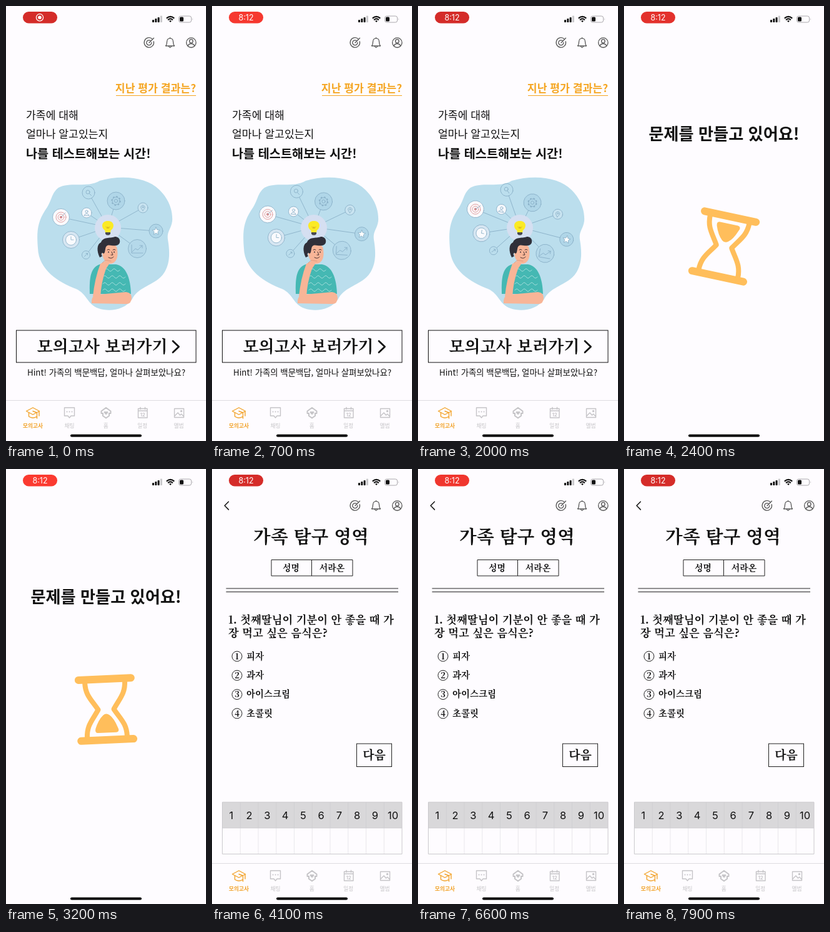
An HTML page for the animation above (8000 ms loop, 320x692 px).

```html
<!DOCTYPE html>
<html lang="ko">
<head>
<meta charset="utf-8">
<title>가족 탐구 영역</title>
<style>
html, body { margin: 0; width: 100%; height: 100%; overflow: hidden; background: #fefcff; }
svg { display: block; width: 320px; height: 692px; }
text { font-family: "Noto Sans CJK KR", "Noto Sans CJK", sans-serif; fill: #111; }
.serif { font-family: "Noto Serif CJK KR", "Noto Serif KR", "Noto Sans CJK KR", "Noto Sans CJK", serif; font-weight: 600; }
.num { font-family: Inter, Roboto, sans-serif; }
.b { font-weight: 700; }
.mid { text-anchor: middle; }
.line { fill: none; stroke-linecap: round; stroke-linejoin: round; }
</style>
</head>
<body>
<svg viewBox="0 0 320 692">
  <rect width="320" height="692" fill="#fefcff"/>

  <g id="status">
    <rect id="pill" x="27" y="9" width="55" height="18.5" rx="9.25"/>
    <g id="rec">
      <circle cx="54" cy="18.3" r="5.6" fill="none" stroke="#fff" stroke-width="1.3"/>
      <circle cx="54" cy="18.3" r="2.8" fill="#fff"/>
    </g>
    <text id="clock" class="num mid" x="54.5" y="23" font-size="12.5" style="fill:#fff">8:12</text>
    <g fill="#111">
      <rect x="234" y="22" width="3" height="4" rx=".8"/>
      <rect x="238.3" y="20" width="3" height="6" rx=".8"/>
      <rect x="242.6" y="18" width="3" height="8" rx=".8"/>
      <rect x="246.9" y="15.5" width="3" height="10.5" rx=".8" fill="#c9c8cb"/>
    </g>
    <g class="line" stroke="#111" stroke-width="2.1" style="stroke-linecap:butt">
      <path d="M256.8 19.6Q263 14 269.2 19.6M259.1 22.2Q263 18.7 266.9 22.2"/>
      <path d="M263 26l-2-2.2q2-1.5 4 0z" fill="#111" stroke="none"/>
    </g>
    <rect x="276.5" y="16" width="20" height="10" rx="3" fill="none" stroke="#aaa8ac"/>
    <rect x="278" y="17.5" width="6" height="7" rx="1.5" fill="#111"/>
    <path d="M298 19.3q1.6 1.7 0 3.4z" fill="#aaa8ac"/>
  </g>

  <g id="chrome">
    <g class="line" stroke="#555" stroke-width="1.3">
      <path d="M233.5 52A7.7 7.7 0 1 0 236.3 56.3M231 55A4 4 0 1 0 232.8 58M229 58.5l7.5-7.5"/>
      <path d="M255.5 63.5q2-2 2-6.5c0-7.5 10-7.5 10 0q0 4.500 2 6.500zM260.5 64.5q2 3 4 0M262.5 51.3v-1"/>
      <circle cx="296.3" cy="58.3" r="7.7"/>
      <circle cx="296.3" cy="56" r="2.8"/>
      <path d="M291 63.5q1.2-3.5 5.3-3.5t5.3 3.5"/>
    </g>
    <path d="M0 627.5H320" stroke="#dedce0"/>
    <g class="line" stroke="#f2a32b" stroke-width="1.4">
      <path d="M32.5 644.5l10.5-5.5 10.5 5.500-10.500 5.500zM36.500 647v6q6.500 4.500 13 0v-6M53 645v7M43 644.500l6.500 2.500v9"/>
    </g>
    <g class="line" stroke="#c5c4c7" stroke-width="1.4">
      <path d="M93.500 639h16v13h-5.500l-2.500 3-2.500-3h-5.500z"/>
      <path d="M97.500 645.500h.1M101.500 645.500h.1M105.500 645.500h.1" stroke-width="1.900"/>
      <path d="M152.500 644.500l7.500-5.500 7.500 5.500v3.500h-2.500v4l-5 3.500-5-3.500v-4h-2.500z" stroke-width="2"/>
      <path d="M160 650l-3-3c0-3 3-2 3-.5 0-1.500 3-2.500 3 .5z" fill="#c5c4c7" stroke-width=".6"/>
      <path d="M211.500 640.500h14.500v14.500h-14.500zM211.500 644h14.500M215 638.500v3M222.500 638.500v3"/>
      <path d="M269.500 640.500h15v14h-15zM270 652l5-5 3.500 4 2-2 4 4"/>
      <circle cx="280.500" cy="644.500" r="1"/>
    </g>
    <text class="num mid b" x="218.7" y="652.8" font-size="7.3" style="fill:#c5c4c7">12</text>
    <g id="tabs" font-size="8.7" class="mid"></g>
  </g>

  <g id="home">
    <text class="b" x="304" y="137" font-size="17.2" text-anchor="end" style="fill:#f5a623">지난 평가 결과는?</text>
    <path d="M176 142.5H304" stroke="#f5a623"/>
    <text x="32" y="180" font-size="17.2">가족에 대해</text>
    <text x="32" y="210" font-size="17.2">얼마나 알고있는지</text>
    <text class="b" x="32" y="241.5" font-size="19.7">나를 테스트해보는 시간!</text>
    <path fill="#bbdeed" d="M150 278C185 268 225 272 245 292C262 308 267 328 266 342C264 356 257 358 259 372C263 395 263 420 243 435C228 446 210 450 202 466C190 484 165 487 148 481C130 475 130 458 112 450C85 440 52 420 51 385C49 360 50 345 62 326C74 310 72 298 84 289C103 279 130 290 150 278Z"/>
    <g id="orbit" class="line" stroke="#86adc5" stroke-width=".8"></g>
    <circle cx="163" cy="353" r="21" fill="#d5dff1"/>
    <path d="M163 342c-11 0-11 11-4.5 15v3h9v-3c6.5-4 6.5-15-4.5-15z" fill="#fbea24"/>
    <path d="M160 351l2 3 1-3 1 3 2-3" class="line" stroke="#d4a91c" stroke-width=".8"/>
    <path d="M159 360h8v2.5l-2 2h-4l-2-2z" fill="#4a4a52"/>
    <path d="M134 458C133 430 136 416 150 411L176 411C192 414 199 432 200 458Z" fill="#45b8b3"/>
    <g id="waves" class="line" stroke="#a4dedb" stroke-width="1"></g>
    <path d="M137 473Q136 459 148 459L192 455Q201 456 201 464 201 474 192 474z" fill="#f8b597"/>
    <path d="M139 462Q142 433 151 410l10-5 5 4-6 9Q152 440 151 464z" fill="#f8b597"/>
    <path d="M155 384Q167 373 177 383C181 398 177 409 167 410 156 408 152 397 155 384z" fill="#f8b597"/>
    <path d="M150 400C145 390 145 379 152 376 156 366 169 370 174 367 184 367 184 378 179 380 171 384 164 377 160 383 158 388 159 393 156 394 154 391 151 394 154 398z" fill="#30303a"/>
    <path d="M162 388q2-2 4 0M171 388q2-2 4 0M169 391l2 5h-3M164 400q5 3 8-1" class="line" stroke="#4b3433" stroke-width="1"/>
    <path d="M164 391.5h.1M173 391.5h.1" class="line" stroke="#30303a" stroke-width="1.8"/>
    <path d="M154 409q4-6 9-4l5 1" class="line" stroke="#e0977b" stroke-width=".9"/>
    <rect x="16.5" y="516" width="287.5" height="51" fill="none" stroke="#111"/>
    <text class="serif mid" x="154" y="550.5" font-size="26">모의고사 보러가기</text>
    <path d="M267 533l9.5 9-9.5 9" class="line" stroke="#111" stroke-width="2.8"/>
    <text class="mid" x="160.5" y="588" font-size="13.4">Hint! 가족의 백문백답, 얼마나 살펴보았나요?</text>
  </g>

  <g id="loading">
    <text class="b mid" x="160" y="213" font-size="26.2">문제를 만들고 있어요!</text>
    <g id="glass">
      <g class="line" stroke="#ffbe5b">
        <path d="M-42-48.5H42M-42 48.5H42" stroke-width="12"/>
        <path stroke-width="8" d="M-32-44C-32-24-23-17-12.5 0C-23 17-32 24-32 44M32-44C32-24 23-17 12.5 0C23 17 32 24 32 44"/>
        <path id="stream" stroke-width="3.5" d="M0 8V-34"/>
      </g>
      <path id="full" class="sand" fill="#ffbe5b"/>
      <path id="heap" class="sand" fill="#ffbe5b"/>
    </g>
  </g>

  <g id="quiz">
    <path d="M26.5 52l-6.3 6.3 6.3 6.3" class="line" stroke="#111" stroke-width="1.5"/>
    <text class="serif mid" x="158.5" y="118" font-size="28.8">가족 탐구 영역</text>
    <path d="M95 144.5H225V170H95zM159.5 144.5V170M22.5 190H298M22.5 195.5H298" fill="none" stroke="#222"/>
    <text class="serif mid" x="126.5" y="162" font-size="14">성명</text>
    <text class="serif mid" x="192" y="162" font-size="14">서라온</text>
    <g font-size="17.4">
      <text class="serif" x="26" y="246">1. 첫째딸님이 기분이 안 좋을 때 가</text>
      <text class="serif" x="26" y="267">장 먹고 싶은 음식은?</text>
    </g>
    <g id="options"></g>
    <rect x="231.5" y="437" width="56" height="36.5" fill="none" stroke="#222"/>
    <text class="serif mid" x="259.5" y="462" font-size="19">다음</text>
    <rect x="16.5" y="530" width="287.5" height="41" fill="#d9d8da"/>
    <g id="table"></g>
    <path d="M16.5 530V612.5H304V530zM16.5 571H304" fill="none" stroke="#cbcacd"/>
  </g>

  <path d="M105 683.5H215" class="line" stroke="#000" stroke-width="4"/>
</svg>
<script>
const LOOP = 8000, LOAD_AT = 2100, QUIZ_AT = 3900, FLIP = 1150;
const $ = id => document.getElementById(id);
const fill = (id, list, fn) => $(id).innerHTML = list.map(fn).join('');

fill('tabs', ['모의고사', '채팅', '홈', '일정', '앨범'], (name, i) =>
  `<text x="${43 + i * 58.4}" y="${i ? 671 : 670.5}" ${i ? 'style="fill:#c5c4c7"' : 'class="b" style="fill:#f2a32b"'}>${name}</text>`);

fill('options', ['피자', '과자', '아이스크림', '초콜릿'], (name, i) => {
  const y = 298 + i * 30.3;
  return `<circle cx="40" cy="${y}" r="8" fill="none" stroke="#222"/>
    <text class="serif mid" x="40" y="${y + 4.7}" font-size="13">${i + 1}</text>
    <text class="serif" x="55" y="${y + 4.7}" font-size="14.5">${name}</text>`;
});

fill('table', [...Array(10).keys()], i => {
  const x = 16.5 + i * 28.75;
  return `<path d="M${x} 530V571" stroke="#cfced1" stroke-width=".8"/>
    <path d="M${x} 571V612" stroke="#e4e3e6" stroke-width=".8"/>
    <text class="num mid" x="${x + 14.4}" y="556.5" font-size="16.5">${i + 1}</text>`;
});

fill('waves', [420, 431, 442, 452], (y, i) =>
  `<path d="M${i ? 155 : 158} ${y}q3-4 6 0t6 0 6 0 6 0${i ? ' 6 0 6 0' : ''}"/>`);

// x, y, radius, disc colour, symbol
const nodes = [
  [132, 297, 10, '#bbdeed', '<circle cx="-1" cy="-1" r="3"/><path d="M1.5 1.5l3 3"/>'],
  [176, 310, 14, '#b0d6e8', '<circle r="6"/><circle r="2.6"/><circle r="7" stroke-width="1.4" stroke-dasharray="2.5 3" stroke-linecap="butt"/>'],
  [219, 321, 8, '#c8e3f0', '<path d="M0 4.5Q-4 0-3-2 0-6 3-2 4 0 0 4.5z"/><circle cy="-1" r="1"/>'],
  [240, 358, 11, '#b0d6e8', '<path fill="#fff" d="M0-6l1.8 4 4.2.4-3.2 2.9 1 4.2L0 3.2-3.8 5.5l1-4.2L-6-1.6l4.2-.4z"/>'],
  [210, 386, 14.5, '#b5d9ea', '<path d="M-9-6V7H9M-8 5l5-5 4 2 7-7M4-5h4v4"/>'],
  [129, 329, 8, '#f6f8fc', '<circle cy="-2" r="2"/><path d="M-4 4q4-6 8 0z"/>'],
  [88, 336, 13.5, '#fbfafd', '<g stroke="#dc8b8b"><circle r="8"/><circle r="4.8"/><circle r="1.7" fill="#dc8b8b"/></g><path d="M0 0l7-7"/>'],
  [104, 372, 13.5, '#d6e6f2', '<circle r="8.5" fill="#f9fafd"/><path d="M0-5V0H4"/>'],
  [128, 396, 6.5, '#bbdeed', '<path d="M-2.5 2.5l5-5M0-2.5h2.5V0"/>']
];
fill('orbit', nodes, ([x, y]) => `<path d="M163 352L${x} ${y}"/>`);
$('orbit').innerHTML += nodes.map(([x, y, r, disc, symbol]) =>
  `<g transform="translate(${x} ${y})"><circle r="${r}" fill="${disc}"/>${symbol}</g>`).join('');

const sand = 'M-15 37Q-21 36-18 30Q-12 14-5 9Q0 5 5 9Q13 16 18 30Q20 37 14 37Z';
document.querySelectorAll('.sand').forEach(p => p.setAttribute('d', sand));

const angles = [[0, -3], [300, 192], [450, 178], [550, 180], [950, 180], [FLIP, 177]];
const clamp = v => Math.min(1, Math.max(0, v));
const ease = v => v * v * (3 - 2 * v);

function track(keys, t) {
  const i = Math.max(1, keys.findIndex(k => k[0] >= t));
  const [t0, a] = keys[i - 1], [t1, b] = keys[i];
  return a + (b - a) * ease(clamp((t - t0) / (t1 - t0)));
}
const show = (id, on) => $(id).style.display = on ? '' : 'none';
const put = (id, value) => $(id).setAttribute('transform', value);

function turnGlass(t) {
  const u = t % FLIP, fallen = clamp((u - 480) / 450);
  put('glass', `translate(160 382.5) rotate(${track(angles, u)})`);
  put('full', `translate(0 5) scale(${Math.sqrt(1 - fallen)}) translate(0 -5)`);
  put('heap', `translate(0 -37) scale(${Math.sqrt(fallen)}) translate(0 37) scale(1 -1)`);
  show('stream', fallen > 0 && fallen < 1);
}

function render(t) {
  const home = t < LOAD_AT, quiz = t >= QUIZ_AT;
  show('home', home);
  show('loading', !home && !quiz);
  show('quiz', quiz);
  show('chrome', home || quiz);
  show('rec', t < 600);
  show('clock', t >= 600);
  const glow = (1 - Math.cos(t / 1000 * Math.PI)) / 2;
  $('pill').setAttribute('fill', `rgb(${212 + 43 * glow},${44 + 15 * glow},${41 + 8 * glow})`);
  if (home) put('orbit', `rotate(${t * .005} 163 352)`);
  else if (!quiz) turnGlass(t - LOAD_AT);
}

const start = performance.now();
function tick() {
  render((performance.now() - start) % LOOP);
  requestAnimationFrame(tick);
}
tick();
</script>
</body>
</html>
```
